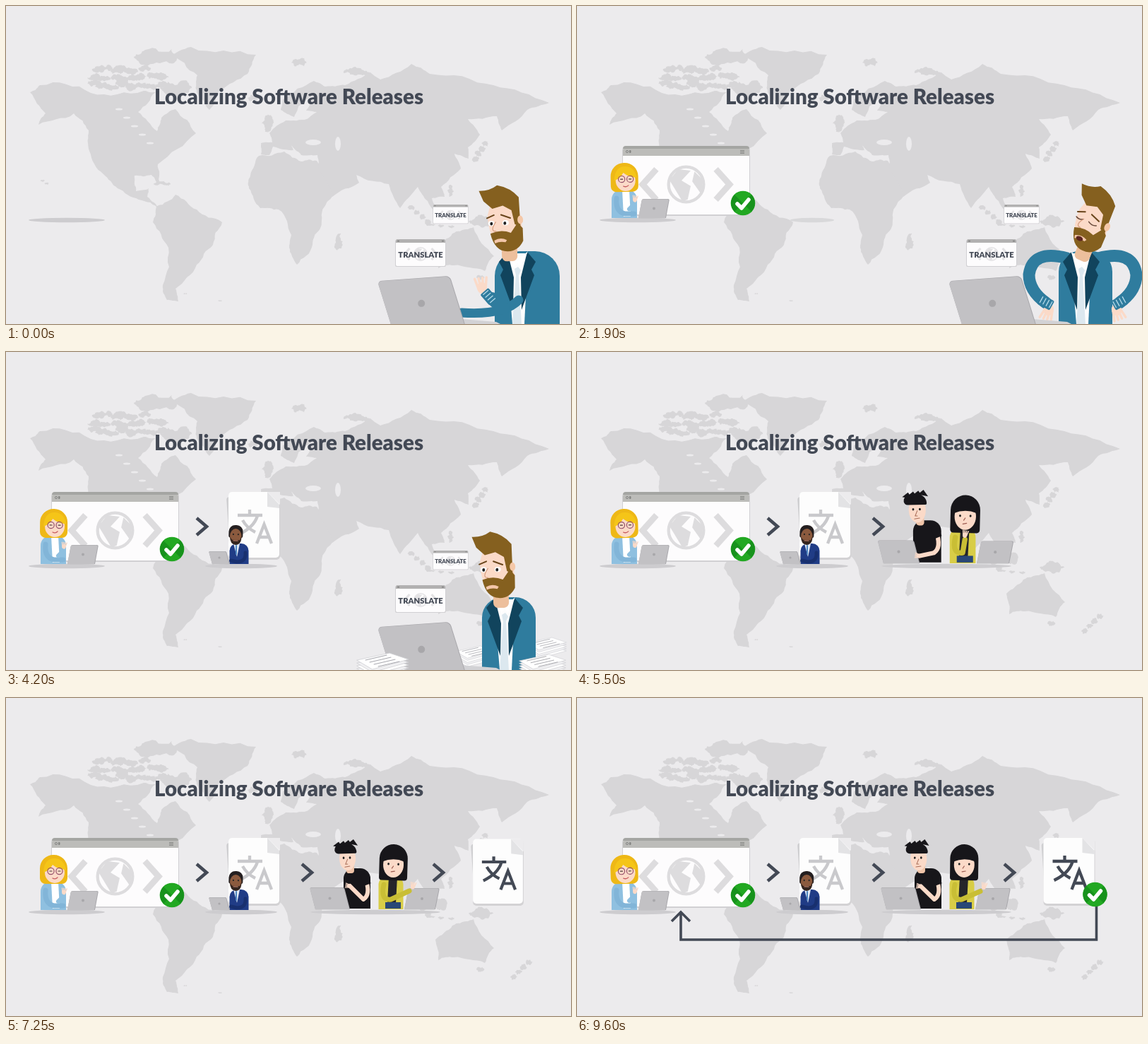
Recreate the animation shown at these times as an HTML page with a canvas. Size 800 by 450 pixels, loop 9650 ms.

```html
<!DOCTYPE html>
<html lang="en">
<head>
<meta charset="utf-8">
<title>Localizing Software Releases</title>
<style>
html, body { margin: 0; width: 100%; height: 100%; overflow: hidden; background: #ecebed; }
canvas { display: block; }
</style>
</head>
<body>
<canvas id="stage" width="800" height="450"></canvas>
<script>
const LOOP = 9650, INK = '#434955', SKIN = '#fbdac8', MAP = '#d7d6d8', BG = '#ecebed', BLACK = '#17161a';
const HAIR = '#85601f', COAT = '#2f7c9e', LAPEL = '#11445d';
const stage = document.getElementById('stage').getContext('2d');
let c = stage;

// Timing
const clamp = v => Math.max(0, Math.min(1, v));
const ease = (t, a, b) => { const k = clamp((t - a) / (b - a)); return k * k * (3 - 2 * k); };
const back = k => 1 + 2.2 * (k - 1) ** 3 + 1.2 * (k - 1) ** 2;
const wave = (t, period) => Math.sin(t / period * 2 * Math.PI);

// Drawing
function fill(d, color) { c.fillStyle = color; c.fill(new Path2D(d)); }
function line(d, color, width, cap = 'round') {
  c.strokeStyle = color; c.lineWidth = width; c.lineCap = cap;
  c.lineJoin = cap === 'round' ? 'round' : 'miter';
  c.stroke(new Path2D(d));
}
function oval(x, y, rx, ry, color) {
  c.fillStyle = color; c.beginPath(); c.ellipse(x, y, rx, ry, 0, 0, 7); c.fill();
}
function ring(x, y, r, color, width) {
  c.strokeStyle = color; c.lineWidth = width;
  c.beginPath(); c.arc(x, y, r, 0, 7); c.stroke();
}
function box(x, y, w, h, r, color) {
  c.fillStyle = color; c.beginPath(); c.roundRect(x, y, w, h, r); c.fill();
}
function text(s, x, y, size) {
  c.font = `900 ${size}px Lato, sans-serif`; c.textAlign = 'center';
  c.fillStyle = INK; c.fillText(s, x, y);
}
function place(x, y, scale, draw) { c.save(); c.translate(x, y); c.scale(scale, scale); draw(); c.restore(); }
function about(x, y, sx, sy, angle, draw) {
  c.save(); c.translate(x, y); c.rotate(angle); c.scale(sx, sy); c.translate(-x, -y); draw(); c.restore();
}
const tilt = (x, y, angle, draw) => about(x, y, 1, 1, angle, draw);
function mirror(x, draw) { draw(); about(x, 0, -1, 1, 0, draw); }
function pop(t, start, x, y, draw) {
  const s = t > start ? back(clamp((t - start) / 350)) : 0;
  if (s > 0) about(x, y, s, s, 0, draw);
}

// World map: key points joined by a seeded fractal coast
let seed = 7;
const random = () => (seed = seed * 16807 % 2147483647) / 2147483647;
function land(points, rough = .22) {
  for (let level = 0; level < 3; level++) points = points.flatMap(([x, y], i) => {
    const [u, v] = points[(i + 1) % points.length], k = (random() - .5) * rough;
    return [[x, y], [(x + u) / 2 + (v - y) * k, (y + v) / 2 - (u - x) * k]];
  });
  fill('M' + points.join('L') + 'Z', MAP);
}
const keys = s => s.split(' ').map(p => p.split(',').map(Number));
function isle(x, y, rx, ry) {
  land(Array.from({ length: 6 }, (_, i) => {
    const a = i * Math.PI / 3, r = .8 + random() * .4;
    return [x + Math.cos(a) * rx * r, y + Math.sin(a) * ry * r];
  }), .5);
}
function chain(n, x, y, dx, dy, rx, ry) {
  for (let i = 0; i < n; i++) isle(x + dx * i, y + dy * i, rx, ry);
}
function paintBackground() {
  c.fillStyle = BG; c.fillRect(0, 0, 800, 450);
  // Americas and Greenland
  land(keys('34,122 48,112 120,123 195,120 212,122 187,150 214,177 220,158 240,146 269,180 215,224 217,252 206,239 182,240 184,262 202,258 200,270 218,288 188,274 158,258 138,238 118,205 117,176 96,152 46,168 56,152'));
  land(keys('229,72 262,58 354,69 342,96 302,120 288,147 270,122 271,98'));
  land(keys('214,283 240,267 270,288 306,306 293,338 270,366 240,400 244,418 228,416 222,395 230,342 208,306'));
  // Africa and Eurasia
  land(keys('358,212 394,206 418,220 440,219 460,258 478,257 447,294 446,312 434,338 412,366 402,348 404,324 386,288 360,286 344,258 346,240'));
  land(keys('361,194 377,193 373,180 396,162 426,160 440,150 425,148 435,126 414,142 408,157 389,147 392,132 436,106 452,114 480,112 516,94 530,104 574,82 600,96 690,112 769,137 738,147 702,176 695,156 654,160 671,182 654,200 655,216 635,209 644,230 616,256 621,270 603,272 613,299 597,276 583,256 558,286 542,252 496,239 500,250 462,270 442,228 441,211 418,211 402,194 407,204 378,199 373,211 361,210'), .14);
  land(keys('608,342 632,322 654,316 662,313 691,354 678,375 634,367 612,371'));
  // Arctic islands, then the smaller arcs
  for (let i = 0; i < 22; i++) {
    const x = 124 + i % 8 * 13 + random() * 8;
    isle(x, 109 - Math.floor(i / 8) * 11 + random() * 6, 10, 4.5);
  }
  isle(215, 72, 37, 12); isle(241, 116, 27, 12);
  isle(415, 80, 13, 6); isle(495, 94, 18, 4); isle(350, 130, 10, 5);
  isle(371, 166, 8, 13); isle(472, 333, 5, 13);
  isle(220, 252, 14, 2); isle(630, 262, 4, 8); isle(615, 292, 10, 10); isle(674, 305, 16, 7);
  chain(4, 574, 285, 8, 7, 5, 4); chain(4, 664, 216, 5, -7, 5, 4); chain(4, 740, 374, -7, 7, 5, 4);
  chain(2, 52, 247, 6, 4, 3, 1.5); chain(2, 254, 407, 49, 10, 3, 1); chain(3, 602, 310, 14, 1, 5, 1.5);
  isle(672, 384, 5, 4);
  oval(435, 193, 11, 4, BG); oval(470, 195, 4, 10, BG);
  for (let i = 0; i < 5; i++) oval(160 + i * 11, 146 + i * 12, 5, 1.5, BG);
  text('Localizing Software Releases', 400.5, 138.5, 29.5);
}
const backdrop = document.createElement('canvas');
backdrop.width = 800; backdrop.height = 450;

// Props
function shadow(x, rx, k = 1) {
  c.globalAlpha = k; oval(x, 303, rx * k, 3.2, '#cdcccf'); c.globalAlpha = 1;
}
function codeIcon(x, y, scale, color) {
  place(x, y, scale, () => {
    mirror(0, () => line('M-39 -20L-57 0 -39 20', color, 8, 'butt'));
    ring(0, 0, 23, color, 4);
    fill('M-22 -6L-10 -20 6 -18 -6 -5 6 2 2 20 -5 22ZM11 -17L22 -6 20 13 8 -4Z', color);
  });
}
function browser() {
  box(64, 199, 181, 98, 5, '#d1d0d3');
  box(65, 198, 179, 97, 5, '#fdfcfd');
  box(65, 198, 179, 14, [6, 6, 0, 0], '#bcbcb9');
  box(65, 198, 179, 4, [6, 6, 0, 0], '#a4a5a2');
  ring(71, 206, 1.6, '#858684', 1); box(74, 204, 2.5, 4, 1, '#858684');
  for (let y = 204; y < 209; y += 2) box(231, y, 6, 1, 0, '#858684');
  codeIcon(154.5, 252.5, 1.08, '#dddcde');
}
function check(x, y) {
  place(x, y, 1, () => {
    oval(0, 0, 17.3, 17.3, '#22a822');
    mirror(0, () => fill('M0 0L-12 -12A17 17 0 0 0 -12 12Z', '#17921c'));
    line('M-8 1L-2 7 8 -5', '#fff', 5.5);
  });
}
const chevron = x => line(`M${x} 235l14 12 -14 12`, INK, 4.6, 'butt');
function page(x, color) {
  place(x, 198, 1, () => {
    tilt(36, 50, -.07, () => box(0, 5, 66, 87, 4, '#cfcfd1'));
    box(0, 1, 73, 95, 5, '#d3d2d4');
    box(0, 0, 72, 93, 5, '#fdfdfd');
    fill('M55 0H73V18Z', BG); fill('M55 0L72 18V23L55 21Z', '#e3e3e5');
    line('M13 33H48M30 25V33M41 34Q36 50 15 60M20 40Q26 51 38 57', color, 4.3, 'butt');
    line('M40 73L50.5 46 61 73M44 64H57', color, 4.3, 'butt');
  });
}
function laptop(x, y, w, h, lean, dot = 2) {
  c.save(); c.transform(1, 0, lean / h, 1, x, y);
  box(0, 0, w, h, [w * .06, w * .06, 0, 0], '#a9a8ac');
  box(0, .6, w - 1, h, [w * .06, w * .06, 0, 0], '#c2c1c4');
  c.restore();
  oval(x + (w + lean) / 2, y + h / 2, dot, dot, '#a8a7aa');
}

// Body parts
const bust = (x, y, w, h, color) => box(x - w / 2, y, w, h, [w * .38, w * .38, 0, 0], color);
const eyes = (x, y, gap, r = 1.4) => { for (const s of [-1, 1]) oval(x + s * gap, y, r, r * 1.2, '#222'); };
function hand(x, y, r, angle) {
  tilt(x, y, angle, () => {
    oval(x, y, r, r * 1.2, SKIN);
    for (let i = -1.5; i < 2; i++) line(`M${x + i * r * .5} ${y}l${i * r * .3} ${-r * 2}`, SKIN, r * .5);
  });
}

function editor(t) {
  const sway = wave(t, 2070);
  bust(67, 260, 36, 40, '#8fc0e0');
  fill('M64 260H74L76 298H66Z', '#fff');
  tilt(68, 262, sway * .04, () => {
    box(48, 222, 39, 41, [19, 19, 8, 8], '#eeb816');
    oval(69, 247, 14, 15, SKIN);
    fill('M53 247Q54 226 70 227 82 228 85 243 74 243 66 236 62 244 53 247Z', '#f5c518');
    for (const x of [63.5, 75.5]) ring(x, 245, 4.6, '#94506a', 1.2);
    line('M62 245H65M74 245H77', '#4b3b3b', 1.2);
    line('M66 255Q70 257 73 254', '#c65c60', 1.3);
  });
  line('M56 272Q54 291 68 294H81', '#82b5d8', 7);
  place(0, sway * 1.5, 1, () => { line('M74 288L81 281', '#8fc0e0', 6); hand(82, 275, 2.8, .15); });
  laptop(92, 273, 39, 27, -5);
}
function translator(t) {
  const sway = wave(t, 1760);
  bust(330, 271, 27, 29, '#203c86');
  fill('M322 271H331L327 290Z', '#dfe9f5'); line('M326 274V286', '#4b84bf', 2);
  tilt(325, 272, sway * .04, () => {
    box(315, 245, 20, 18, [9, 9, 3, 3], '#241f20');
    oval(325, 261, 8.3, 11, '#8b5a3e');
    fill('M317 262L320 266H331L333 260Q334 272 325 273 317 272 317 262Z', '#34251f');
    eyes(325, 258, 3.5, 1); line('M322 267H328', '#bf806b', 1.3);
  });
  laptop(287, 282, 25, 18, 5, 1.6);
  line(`M339 284Q340 297 327 297L${318 + sway} 295`, '#18306f', 5);
}
function team(t) {
  const sway = wave(t, 1950), open = ease(t, 6900, 7250);
  bust(497, 241, 38, 57, BLACK);
  tilt(488, 245, sway * .025, () => {
    box(482, 235, 11, 13, 4, '#efc4a8');
    oval(484, 227, 11.5, 17, SKIN);
    box(466, 206, 31, 14, [10, 14, 2, 6], BLACK);
    for (let i = 0; i < 4; i++) fill(`M${464 + i * 7} ${209 - i}l8 -6 6 9Z`, BLACK);
    eyes(483, 226, 4.5); line('M484 228L481 235H484M480 239L487 238', '#a96e59', 1);
  });
  laptop(430, 268, 49, 31, 8);
  const rise = 23 * open - sway;
  line(`M509 256Q517 278 506 285L487 ${290 - rise}`, SKIN, 6);
  line('M506 249L512 264', BLACK, 10, 'butt');
  hand(486, 290 - rise, 2.6, -1.4);

  bust(545, 251, 35, 48, '#d8cd47');
  fill('M542 253H554L552 290H540Z', '#25252a'); box(537, 289, 22, 9, 0, '#294776');
  tilt(548, 255, -sway * .03, () => {
    box(528, 207, 40, 51, [20, 20, 4, 4], BLACK);
    oval(548, 236, 14.5, 18, SKIN);
    fill('M532 232L536 214Q550 208 563 220V231Q548 225 532 232Z', BLACK);
    eyes(548, 235, 7); line('M548 238L546 241M545 246L550 245', '#9c5a50', 1.2);
  });
  laptop(570, 269, 44, 30, -6);
  const x = 548 + 28 * open, y = 262 + 6 * open + sway;
  line(`M535 264Q530 287 545 285L${x - 5 * open} ${y + 6}`, '#c9be35', 7);
  hand(x, y, 3, .2);
}

// Worried manager and his desk
function managerHead(shut, talk) {
  box(690, 332, 22, 30, 7, '#edbf9c');
  fill('M676 283H716L721 318 712 340H684Q671 318 672 296Z', SKIN);
  fill('M675 322Q690 316 704 322L714 308 721 316V334Q713 349 698 348 680 347 675 322Z', HAIR);
  fill('M680 332Q689 327 698 332L696 335Q688 333 681 336Z', '#f3c6a9');
  if (talk > 0) oval(688, 334, 5, 1 + 2.5 * talk, '#5c2420');
  fill('M667 276L661 261Q676 262 687 254 706 258 717 272L718 314 710 310 706 290 694 283 679 287Z', HAIR);
  oval(718, 304, 4, 6, '#f5c8a8');
  line('M671 300L681 296M691 296L704 301', '#69451b', 2);
  if (shut) line('M672 307Q677 310 682 307M691 307Q697 311 703 308', '#67493b', 1.5);
  else {
    for (const x of [677, 697]) oval(x, 307.5, 4.5, 3.7, '#fff');
    eyes(686.5, 308, 9.5, 2);
  }
  line('M683 306Q674 319 683 319', '#d69e80', 1.2);
}
function torso(grow) {
  bust(712 + grow / 2, 347, 76 + grow, 110, COAT);
  fill('M691 350H721L716 450H699Z', '#fdfdfd');
  fill('M702 372L707 369 711 374 708 381 712 450H699L704 381Z', '#dce8ef');
  mirror(706, () => {
    fill('M692 348L680 362 686 373 682 381 700 430 701 384Z', LAPEL);
    fill('M691 347L701 370 707 362Z', '#fff');
  });
}
function cuff(x, y, angle) {
  tilt(x, y, angle, () => {
    box(x - 10, y - 7, 20, 15, 2, COAT);
    for (let i = -8; i < 9; i += 5) box(x + i, y - 5, 1.3, 10, 0, '#b7dcea');
  });
}
function manager(t) {
  const stand = ease(t, 1150, 1400), sit = ease(t, 2150, 2420), akimbo = stand - sit, plead = 1 - stand;
  const tired = t > 1260 && t < 3250, sway = wave(t, 1500);
  const x = 12 * plead + 16 * akimbo, y = 2 * sit * (1 - ease(t, 3200, 3450)) - plead;
  if (akimbo > .5) mirror(716, () => line('M694 357Q645 344 640 380 640 403 664 420', COAT, 17));
  place(18 * plead + 8 * akimbo, 0, 1, () => torso(16 * plead));
  tilt(704 + x, 350 + y, .38 * akimbo - .04 * plead + sway * .018, () => place(x, y, 1, () =>
    managerHead(tired, tired ? .5 + sway * .4 : 0)));
  if (akimbo > .5) mirror(716, () => { hand(668, 430, 7, 3.5); cuff(664, 419, .5); });
  if (plead > .5) {
    line('M726 416Q705 438 645 434', COAT, 13);
    tilt(705, 425, sway * .04, () => {
      line('M704 428L688 414', COAT, 18);
      hand(674, 399, 7, -.15); cuff(684, 411, .85);
    });
  }
}
function ticket(x, y, scale) {
  place(x, y, scale, () => {
    box(-1, 1, 72, 38, 2, '#d1d0d3'); box(0, 0, 70, 38, 2, '#fdfcfd');
    box(0, 0, 70, 5, [2, 2, 0, 0], '#b2b1b1');
    for (const mark of [2, 65]) box(mark, 2, 3, 1.2, 0, '#777');
    codeIcon(35, 21, .4, '#e3e2e4');
    text('TRANSLATE', 35, 25.7, 11.2);
  });
}
function stack(x, y, scale) {
  place(x, y, scale, () => {
    for (let i = 4; i >= 0; i--) {
      const sheet = `M0 ${10 + i * 4}l46 -10 27 9 -51 14Z`;
      fill(sheet, i % 2 ? '#f1f1f3' : '#fff'); line(sheet, '#d0d0d4', .8);
    }
    for (let i = 0; i < 4; i++) line(`M${12 + i * 6} ${10 + i * 3}l30 -7`, '#aaaab0', 1.1);
  });
}
function desk(t) {
  const drop = 60 * (1 - ease(t, 2270, 2600));
  c.save(); c.globalAlpha = 1 - ease(t, 4600, 4950);
  ticket(605, 281, .7); ticket(552, 330, 1);
  place(0, drop, 1, () => { stack(637, 416, .75); stack(738, 404, .76); });
  manager(t);
  fill('M645 443L694 447 700 450H643Z', '#d2d2d5');
  tilt(586, 418, -.07, () => laptop(528, 385, 103, 72, 17, 5));
  place(0, drop, 1, () => { stack(497, 426, 1); stack(727, 428, .9); });
  c.restore();
}
function returnArrow(t) {
  const k = ease(t, 8100, 8800);
  if (!k) return;
  c.save(); c.setLineDash([676 * k, 700]);
  line('M735.5 293V342H147V303', INK, 3.6, 'butt');
  c.restore();
  if (k > .98) line('M134 316L147 303 160 316', INK, 3.6, 'butt');
}

function render(t) {
  c.drawImage(backdrop, 0, 0);
  shadow(86, 54); shadow(333, 51, ease(t, 1700, 2050)); shadow(523, 92, ease(t, 5100, 5350));
  pop(t, 550, 154, 296, browser);
  pop(t, 150, 76, 301, () => editor(t));
  pop(t, 1150, 235, 279, () => check(235, 279));
  pop(t, 2200, 350, 293, () => page(315, '#c9c9cc'));
  pop(t, 2000, 320, 301, () => translator(t));
  pop(t, 1950, 277, 247, () => chevron(270));
  if (t < 4950) desk(t);
  pop(t, 5080, 426, 247, () => chevron(419));
  pop(t, 5300, 522, 301, () => team(t));
  pop(t, 6650, 612, 247, () => chevron(605));
  pop(t, 7100, 697, 292, () => page(660.5, INK));
  returnArrow(t);
  pop(t, 7500, 733.5, 278, () => check(733.5, 278));
}
c = backdrop.getContext('2d');
paintBackground();
c = stage;
const begin = performance.now();
function frame() {
  render((performance.now() - begin) % LOOP);
  requestAnimationFrame(frame);
}
frame();
</script>
</body>
</html>
```
